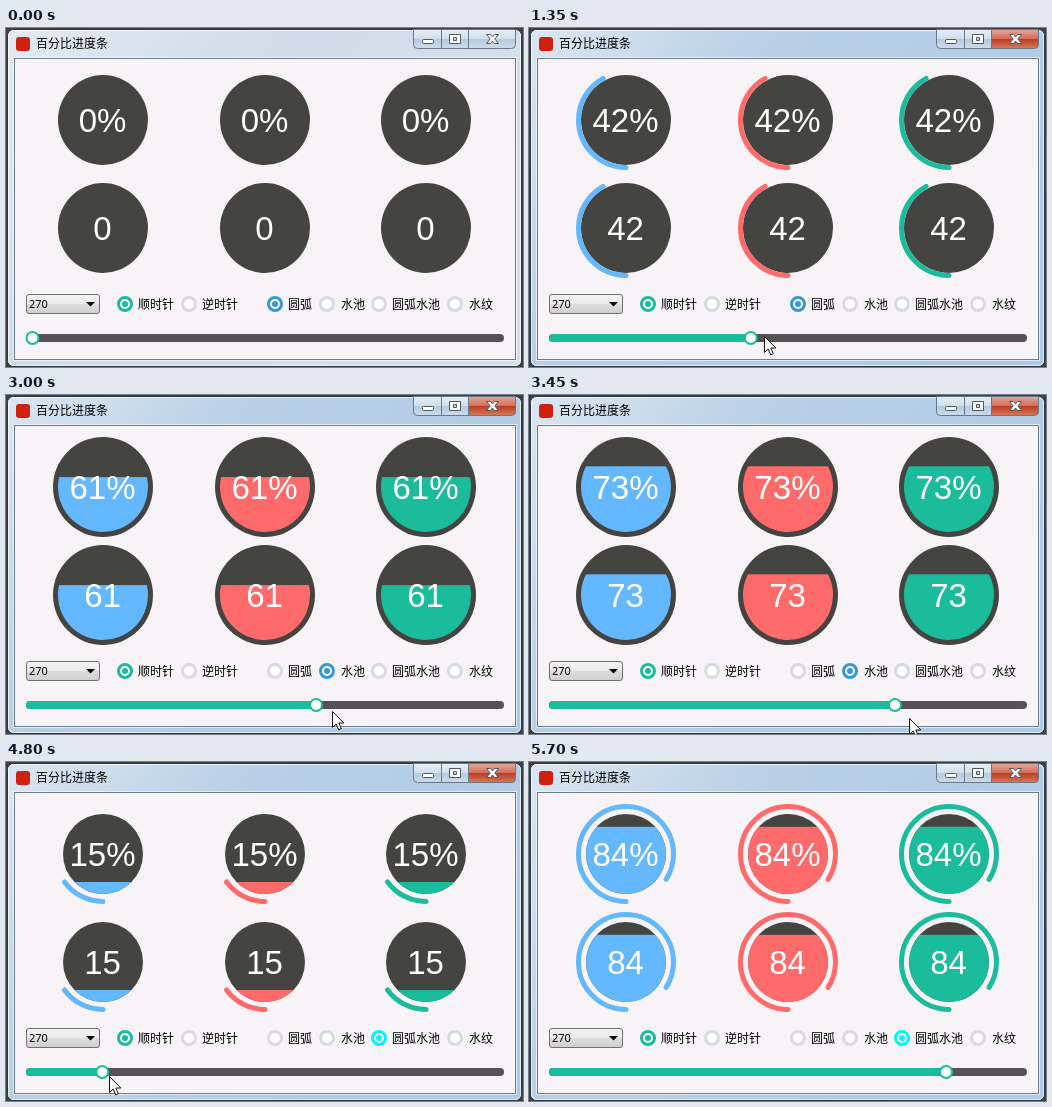
Animation, 517 px wide and 339 px high, one loop 6.15 s. Source, as an HTML page:

```html
<!DOCTYPE html>
<html lang="zh-CN">
<head>
<meta charset="utf-8">
<title>百分比进度条</title>
<style>
html, body { margin: 0; width: 100%; height: 100%; overflow: hidden; background: #3b3e42; }
svg { display: block; width: 517px; height: 339px; }
.ui { font: 12px "Noto Sans CJK SC", "Noto Sans CJK", sans-serif; fill: #000; }
.num { font: 33px "Liberation Sans", Arial, sans-serif; fill: #fff; text-anchor: middle; }
.combo { font: 11px "Noto Sans", sans-serif; }
.focus { fill: none; stroke: #222; stroke-dasharray: 1 1; shape-rendering: crispEdges; }
</style>
</head>
<body>
<svg id="stage" viewBox="0 0 517 339">
  <defs>
    <linearGradient id="idle" x2="1" y2=".5">
      <stop offset="0" stop-color="#e3eaf2"/><stop offset=".45" stop-color="#d0dce9"/><stop offset="1" stop-color="#d5e0ec"/>
    </linearGradient>
    <linearGradient id="active" x2="1" y2=".5">
      <stop offset="0" stop-color="#dae6f2"/><stop offset=".4" stop-color="#b8cfe6"/><stop offset="1" stop-color="#afcae6"/>
    </linearGradient>
    <linearGradient id="cap" x2="0" y2="1">
      <stop offset="0" stop-color="#e6eef6"/><stop offset=".48" stop-color="#d0deec"/>
      <stop offset=".5" stop-color="#b5c9dd"/><stop offset="1" stop-color="#cbdcec"/>
    </linearGradient>
    <linearGradient id="red" x2="0" y2="1">
      <stop offset="0" stop-color="#e5a698"/><stop offset=".48" stop-color="#d0705c"/>
      <stop offset=".5" stop-color="#bb3a22"/><stop offset="1" stop-color="#d77a58"/>
    </linearGradient>
    <linearGradient id="button" x2="0" y2="1">
      <stop offset="0" stop-color="#f3f3f3"/><stop offset=".5" stop-color="#ebebeb"/>
      <stop offset=".51" stop-color="#dddddd"/><stop offset="1" stop-color="#cfcfcf"/>
    </linearGradient>
    <clipPath id="clip45"><circle r="45"/></clipPath>
    <clipPath id="clip40"><circle r="40"/></clipPath>
  </defs>

  <rect id="frame" x="1.5" y="1.5" width="514" height="337" rx="6" stroke="#2f3842"/>
  <rect x="2.5" y="2.5" width="512" height="335" rx="5" fill="none" stroke="#fff" stroke-opacity=".65"/>
  <rect x="7.5" y="29.5" width="503" height="303" fill="none" stroke="#fff" stroke-opacity=".6"/>
  <rect x="8.5" y="30.5" width="501" height="301" fill="#f8f3f7" stroke="#6d7d8e"/>

  <rect x="10" y="9" width="14" height="14" rx="3" fill="#d0210f"/>
  <text class="ui" x="30" y="20">百分比进度条</text>

  <g stroke="#66788a">
    <path d="M407.5 1.5H435.5V20.5H411.5Q407.5 20.5 407.5 16.5Z" fill="url(#cap)"/>
    <path d="M435.5 1.5H462.5V20.5H435.5Z" fill="url(#cap)"/>
    <path id="close" d="M462.5 1.5H509.5V16.5Q509.5 20.5 505.5 20.5H462.5Z"/>
  </g>
  <g fill="#fff" stroke="#4d5864">
    <rect x="416.500" y="11.500" width="11" height="4" rx="1"/>
    <path fill-rule="evenodd" d="M443.500 6.500H454.500V15.500H443.500ZM447.500 9.500H450.500V12.500H447.500Z"/>
    <path d="M480.500 6.500H484.500L486.500 9L488.500 6.500H492.500L488.800 11L492.500 15.500H488.500L486.500 13L484.500 15.500H480.500L484.200 11Z"/>
  </g>

  <g id="gauges"></g>

  <rect x="20.500" y="266.500" width="73" height="19" rx="2.500" fill="url(#button)" stroke="#707070"/>
  <text class="combo" x="23" y="280">270</text>
  <path d="M80 274H89L84.500 278.500Z"/>

  <g id="radios"></g>
  <rect id="focus" class="focus" y="268.500" height="15"/>

  <rect x="20" y="306" width="478" height="8" rx="4" fill="#565154"/>
  <rect id="fill" x="20" y="306" height="8" rx="4" fill="#1abc9c"/>
  <circle id="knob" cy="310" r="6" fill="#fff" stroke="#1abc9c" stroke-width="2"/>

  <path id="cursor" d="M.5 .5V16.500L4.200 13L6.700 18.800L9.300 17.700L6.800 12H11.800Z" fill="#fff" stroke="#111"/>
</svg>
<script>
const STEP = 150, LOOP = 6150;
const NS = "http://www.w3.org/2000/svg";
const $ = id => document.getElementById(id);

function set(el, attrs) {
  for (const k in attrs) el.setAttribute(k, attrs[k]);
}

function add(parent, tag, attrs, text) {
  const el = document.createElementNS(NS, tag);
  set(el, attrs);
  if (text) el.textContent = text;
  return parent.appendChild(el);
}

const show = (el, on) => set(el, { visibility: on ? "visible" : "hidden" });

// Rows of [time, ...values], interpolated linearly
function sample(keys, t) {
  let i = 1;
  while (i < keys.length - 1 && keys[i][0] < t) i++;
  const a = keys[i - 1], b = keys[i];
  const k = Math.min(1, Math.max(0, (t - a[0]) / (b[0] - a[0])));
  return a.slice(1).map((v, n) => v + (b[n + 1] - v) * k);
}

const values = [
  [150, 0], [300, 2], [1350, 42], [1650, 48], [2400, 48], [2700, 53],
  [3450, 73], [3750, 79], [4350, 79], [4500, 62], [4650, 34], [4800, 15],
  [4950, 21], [5100, 36], [5550, 80], [5700, 84]
];
const pointer = [
  [150, 28, 306], [300, 38, 309], [1350, 235, 308], [1650, 258, 312],
  [1950, 319, 277], [2100, 319, 277], [2250, 258, 292], [2400, 253, 306],
  [3450, 380, 323], [3750, 402, 320], [4050, 373, 275], [4200, 399, 317],
  [4350, 399, 317], [4800, 103, 314], [4950, 145, 314], [5100, 221, 314],
  [5550, 425, 330]
];

// Gauge styles: disc radius, water radius, arc visibility
const ARC = 0, POOL = 1, ARC_POOL = 2;
const styles = [
  { disc: 45, water: 0, arc: true },
  { disc: 50, water: 45, arc: false },
  { disc: 40, water: 40, arc: true }
];

const gauges = [];
for (const [y, unit] of [[92, "%"], [200, ""]]) {
  [[97, "#64b8ff"], [259, "#ff6b6b"], [420, "#1abc9c"]].forEach(([x, color]) => {
    const g = add($("gauges"), "g", { transform: `translate(${x} ${y})` });
    gauges.push({
      unit,
      disc: add(g, "circle", { fill: "#444541" }),
      water: add(g, "rect", { x: -50, width: 100, height: 100, fill: color }),
      arc: add(g, "circle", {
        r: 47.5, fill: "none", stroke: color, "stroke-width": 5,
        "stroke-linecap": "round", pathLength: 100, transform: "rotate(90)"
      }),
      label: add(g, "text", { class: "num", x: -0.5, y: 12 })
    });
  });
}

function radio(x, label, labelX) {
  const g = $("radios");
  const ring = add(g, "circle", { cx: x, cy: 276, r: 6.5, fill: "#fff", "stroke-width": 3 });
  const dot = add(g, "circle", { cx: x, cy: 276, r: 3 });
  add(g, "text", { class: "ui", x: labelX, y: 280.5 }, label);
  return color => {
    set(ring, { stroke: color || "#d7dbde" });
    set(dot, { fill: color || "none" });
  };
}

radio(119, "顺时针", 132)("#1abc9c");
radio(183, "逆时针", 196)();
const modes = [
  radio(269, "圆弧", 282), radio(321, "水池", 335), radio(373, "圆弧水池", 386)
];
radio(449, "水纹", 463)();
const modeColors = ["#3498db", "#3498db", "#00f6ff"];

function draw(t) {
  const v = Math.round(sample(values, t)[0]);
  const mode = t < 2100 ? ARC : t < 4050 ? POOL : ARC_POOL;
  const style = styles[mode];
  const active = t >= 150;

  set($("frame"), { fill: active ? "url(#active)" : "url(#idle)" });
  set($("close"), { fill: active ? "url(#red)" : "url(#cap)" });

  for (const g of gauges) {
    set(g.disc, { r: style.disc });
    show(g.water, style.water > 0);
    set(g.water, {
      y: style.water * (1 - v / 50),
      "clip-path": style.water ? `url(#clip${style.water})` : "none"
    });
    show(g.arc, style.arc && v > 0);
    set(g.arc, { "stroke-dasharray": `${v} 200` });
    g.label.textContent = v + g.unit;
  }

  modes.forEach((paint, i) => paint(i === mode && modeColors[i]));
  show($("focus"), (t >= 2100 && t < 2400) || (t >= 4050 && t < 4500));
  set($("focus"), mode === POOL ? { x: 313.5, width: 45 } : { x: 365.5, width: 69 });

  const x = 26.5 + 4.65 * v;
  set($("fill"), { width: x - 20 });
  set($("knob"), { cx: x });

  const [px, py] = sample(pointer, t);
  show($("cursor"), active && t < 5700);
  set($("cursor"), { transform: `translate(${Math.round(px)} ${Math.round(py)})` });
}

const start = performance.now();
let last = -1;
function tick() {
  const t = Math.floor(((performance.now() - start) % LOOP) / STEP) * STEP;
  if (t !== last) draw(last = t);
  requestAnimationFrame(tick);
}
tick();
</script>
</body>
</html>
```
